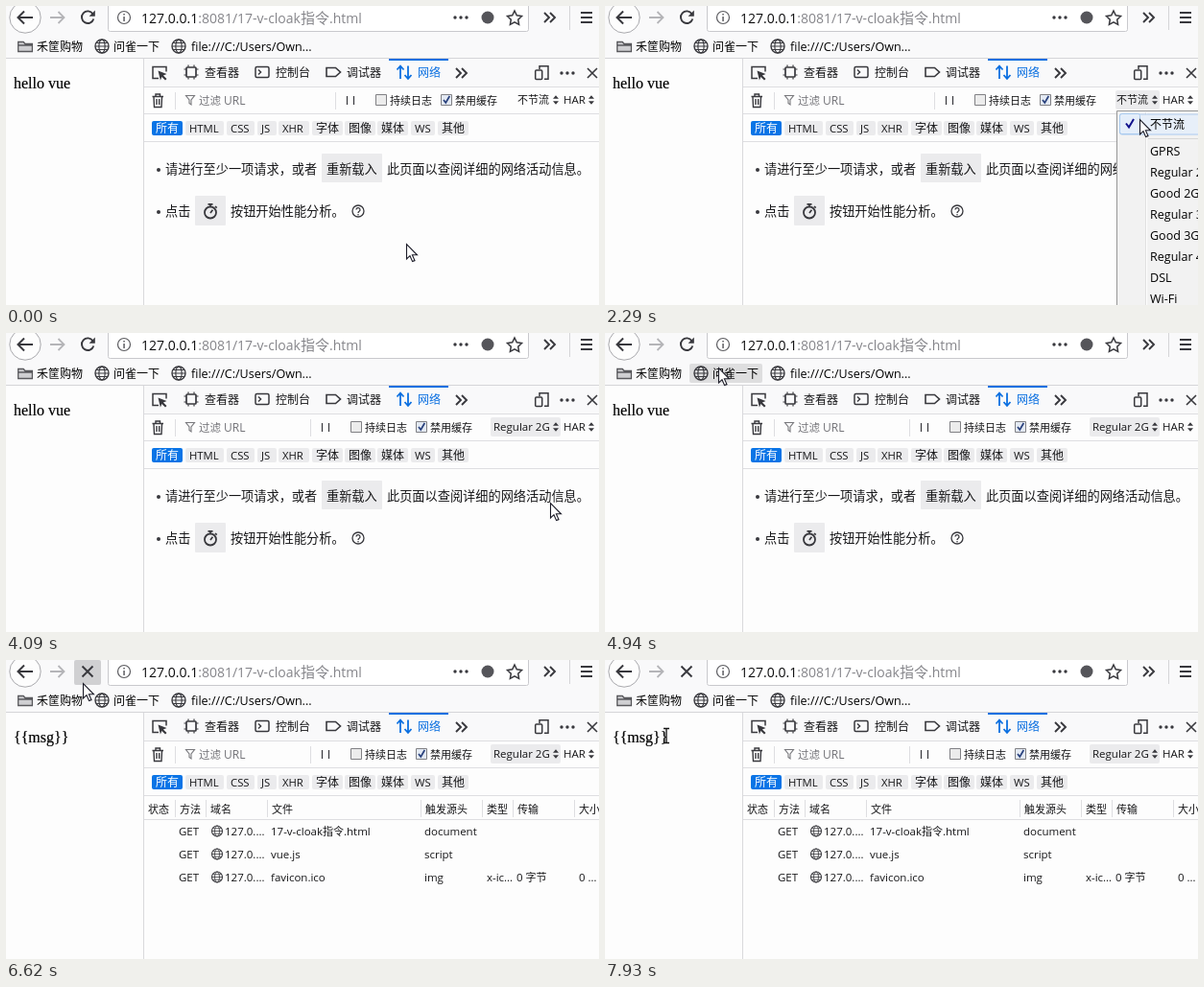
An HTML page with a canvas for the animation above (8 s loop, 618 by 312 pixels).

```html
<!DOCTYPE html>
<html lang="zh">
<head>
<meta charset="utf-8">
<title>v-cloak</title>
<style>
html, body { margin: 0; width: 100%; height: 100%; overflow: hidden; background: #fdfdfd; }
canvas { display: block; }
</style>
</head>
<body>
<canvas id="stage" width="618" height="312"></canvas>
<script>
const ctx = document.getElementById('stage').getContext('2d');
const LOOP = 8000;
const INK = '#161618', ICON = '#38383d', GREY = '#85858a', RULE = '#dedee1', BLUE = '#0a6fe0', CHIP = '#ebebed';
const SANS = '"Open Sans", "Noto Sans CJK SC", "Noto Sans CJK", sans-serif';
const CJK = '"Noto Sans CJK SC", "Noto Sans CJK", sans-serif';
const SERIF = '16px "Liberation Serif", serif';

// start, end, number of steps, destination
const MOVES = [
  [0, 0, 1, 417, 248],
  [410, 1340, 8, 555, 97],
  [2140, 2960, 7, 567, 202],
  [3390, 3660, 3, 567, 177],
  [4400, 4940, 5, 118, 36],
  [5090, 5370, 3, 87, 16],
  [6620, 7120, 5, 23, 96],
  [7250, 7660, 4, 55, 100],
  [7780, 7780, 1, 15, 105],
  [7930, 7930, 1, 64, 79]
];

function pointerAt(t) {
  let x = 0, y = 0;
  for (const [start, end, steps, tx, ty] of MOVES) {
    if (t < start) break;
    const gap = (end - start) / (steps - 1) || 1;
    const p = Math.min(steps, Math.floor((t - start) / gap + 0.1) + 1) / steps;
    const e = p * p * (3 - 2 * p);
    x += (tx - x) * e;
    y += (ty - y) * e;
  }
  return { x, y };
}

function box(x, y, w, h, color, radius = 0) {
  ctx.fillStyle = color;
  ctx.beginPath();
  ctx.roundRect(x, y, w, h, radius);
  ctx.fill();
}

function frame(x, y, w, h, color, radius = 0, width = 1) {
  ctx.strokeStyle = color;
  ctx.lineWidth = width;
  ctx.beginPath();
  ctx.roundRect(x, y, w, h, radius);
  ctx.stroke();
}

function line(d, color = ICON, width = 1.6) {
  ctx.strokeStyle = color;
  ctx.lineWidth = width;
  ctx.stroke(new Path2D(d));
}

function fill(d, color = ICON) {
  ctx.fillStyle = color;
  ctx.fill(new Path2D(d));
}

function ring(x, y, r, color = ICON, width = 1.5, rx = r) {
  ctx.strokeStyle = color;
  ctx.lineWidth = width;
  ctx.beginPath();
  ctx.ellipse(x, y, rx, r, 0, 0, 7);
  ctx.stroke();
}

function dot(x, y, r, color = ICON) {
  ctx.fillStyle = color;
  ctx.beginPath();
  ctx.arc(x, y, r, 0, 7);
  ctx.fill();
}

// Latin and Chinese runs have their own sizes; returns the end of the text
function text(str, x, y, color = INK, cjk = 11, latin = cjk * 1.045) {
  ctx.fillStyle = color;
  for (const run of str.match(/[\u2e80-\uffff]+|[^\u2e80-\uffff]+/g)) {
    ctx.font = run.charCodeAt(0) >= 0x2e80 ? `${cjk}px ${CJK}` : `${latin}px ${SANS}`;
    ctx.fillText(run, x, y);
    x += ctx.measureText(run).width;
  }
  return x;
}

function globe(x, y, r, width) {
  ring(x, y, r, ICON, width);
  ring(x, y, r, ICON, width * 0.8, r * 0.45);
  line(`M${x - r} ${y}h${2 * r}M${x - r * 0.8} ${y - r / 2}h${r * 1.6}M${x - r * 0.8} ${y + r / 2}h${r * 1.6}`, ICON, width * 0.7);
}

const dots = (x, y) => [-6, 0, 6].forEach(dx => dot(x + dx, y, 1.7));
const chevrons = (x, y) => line(`M${x - 6} ${y - 5}l5 5l-5 5M${x} ${y - 5}l5 5l-5 5`, ICON, 1.9);
const sorter = (x, y) => fill(`M${x - 3} ${y - 1.2}l3 -3.6l3 3.6zM${x - 3} ${y + 1.2}l3 3.6l3 -3.6z`);

function checkbox(x, on) {
  box(x, 93, 11, 11, on ? '#e3e9f3' : '#ececec');
  frame(x + 0.5, 92.5, 11, 11, '#808084');
  if (on) line(`M${x + 3} 98l2.3 3l4 -7`, '#28407c', 1.7);
}

function drawReload(t) {
  if (t < 5890) {
    line('M90.5 8.2A6.3 6.3 0 1 0 91.3 13.5', ICON, 1.9);
    fill('M92.8 4.5v6.2h-6.2z');
  } else if (t < 6040) {
    line('M80.5 16.5A6.2 6.2 0 1 1 89.5 16.5', '#8b8b8f', 1.9);
  } else {
    line('M79.5 6.5l11 11M90.5 6.5l-11 11', ICON, 1.9);
  }
}

function drawChrome(t, p) {
  box(0, 0, 618, 55, '#f9f9fa');
  box(106, -4, 439, 31, '#fff', 2);
  frame(106.5, -4.5, 438, 31, '#c9c9cd', 2);
  box(587, 0, 1, 25, '#d5d5d8');
  dot(20, 12, 16, '#fdfdfd');
  ring(20, 12, 16.2, '#a9a9ad', 1);
  line('M28 12H13M19 5.5L12.5 12L19 18.5', ICON, 2);
  line('M46 12h14M54.5 6l6 6l-6 6', '#b5b5b8', 1.8);
  if (p.y < 27 && p.x > 71 && p.x < 99) box(71, 0, 28, 26, t < 5890 ? '#dededf' : '#d0d0d2', 2);
  drawReload(t);

  ring(123, 12, 6.5, '#5c5c60', 1.2);
  box(122.3, 11, 1.5, 5, '#5c5c60');
  box(122.3, 8, 1.5, 1.6, '#5c5c60');
  const end = text('127.0.0.1', 141, 18, '#0c0c0d', 15, 14);
  text(':8081/17-v-cloak指令.html', end, 18, GREY, 15, 14);
  dots(474, 12);
  dot(502, 12, 6.5, '#55555a');
  line('M530 5l2.3 4.8l5.2 .7l-3.8 3.7l.9 5.2l-4.6 -2.5l-4.6 2.5l.9 -5.2l-3.8 -3.7l5.2 -.7z', ICON, 1.5);
  chevrons(567, 12);
  line('M599 7h12M599 12h12M599 17h12', ICON, 1.8);

  if (p.y > 30 && p.y < 54 && p.x > 89 && p.x < 165) box(88, 32, 76, 20, '#dededf', 2);
  const folder = 'M12.7 47.5v-10h5.5l1.7 2h7.5v8z';
  fill(folder, '#cfcfd2');
  line(folder + 'M12.7 41h14.7', '#59595d', 1.3);
  text('禾筐购物', 32, 47, '#000', 12);
  globe(100, 42, 7, 1.4);
  text('问雀一下', 112, 47, '#000', 12);
  globe(180, 42, 7, 1.4);
  text('file:///C:/Users/Own...', 193, 47, '#000', 12);
  box(0, 54, 618, 1, '#d5d5d8');
}

function drawTabs() {
  box(144, 55, 474, 29, '#f9f9fa');
  box(399, 55, 62, 2, BLUE);
  line('M159 75.5h-6v-12h14v5', ICON, 1.5);
  fill('M158.5 67.5l9 3.5l-3.6 1.5l3.6 3.6l-1.5 1.5l-3.6 -3.6l-1.5 3.5z');
  frame(188, 64, 10, 10, ICON, 1, 1.7);
  line('M190 61.5v2M196 61.5v2M190 74.5v2M196 74.5v2M185.5 66h2M185.5 72h2M198.5 66h2M198.5 72h2', ICON, 1.2);
  frame(260, 63.5, 14, 11, ICON, 1.5, 1.5);
  line('M263 66.5l2.6 2.5l-2.6 2.5', ICON, 1.4);
  line('M334 64.5h9.5l5 4.5l-5 4.5h-9.5z', ICON, 1.6);
  line('M411 76v-13M407.5 66.5l3.5 -4l3.5 4M419 62.5v13M415.5 72l3.5 4l3.5 -4', BLUE, 1.8);
  text('查看器', 207, 74, INK, 12);
  text('控制台', 281, 74, INK, 12);
  text('调试器', 355, 74, INK, 12);
  text('网络', 429, 74, BLUE, 12);
  chevrons(475, 70);
  line('M556 66v-3.3h9v13.5h-4', ICON, 1.5);
  frame(551.7, 67, 7, 9.5, ICON, 1, 1.5);
  dots(585, 70);
  line('M606 65l10 10M616 65l-10 10', ICON, 1.6);
  box(144, 84, 474, 1, RULE);
}

function drawFilters(t, p) {
  const slow = t >= 4090, dx = slow ? -26 : 0;
  line('M152.5 94.5h11.5M156 94v-2h4.5v2M154 95l.5 10.5h7.5l.5 -10.5M157 97v6M159.7 97v6', ICON, 1.4);
  box(176, 90, 1, 18, RULE);
  line('M187.5 93.5h9l-3.5 4.5v5l-2 -1.5v-3.5z', '#78787c', 1.1);
  text('过滤 URL', 201, 103, '#737378', 11.5, 12);
  box(343 + dx, 90, 1, 18, RULE);
  line(`M${355.5 + dx} 94v9M${362.5 + dx} 94v9`, ICON, 1.2);
  checkbox(385 + dx, false);
  text('持续日志', 400 + dx, 103);
  checkbox(453 + dx, true);
  text('禁用缓存', 468 + dx, 103);
  const hover = p.x > 532 && p.x < 578 && p.y > 88 && p.y < 109;
  if (slow) box(505, 88, 73, 20, CHIP, 2);
  else if (hover || t >= 1770) box(532, 88, 46, 20, CHIP, 2);
  if (slow) text('Regular 2G', 508, 102);
  else text('不节流', 533, 102);
  sorter(573, 98);
  text('HAR', 581, 102);
  sorter(610, 98);
  box(144, 112, 474, 1, RULE);

  const types = [['所有', 152, 32], ['HTML', 187, 40], ['CSS', 230, 29], ['JS', 262, 20], ['XHR', 284, 32],
    ['字体', 319, 32], ['图像', 353, 32], ['媒体', 387, 32], ['WS', 422, 25], ['其他', 450, 32]];
  types.forEach(([name, x, w], i) => {
    box(x, 120, w, 15, i ? CHIP : '#0a74e6', 2);
    text(name, x + 4, 132, i ? INK : '#fff', 12, 11.3);
  });
  box(144, 141, 474, 1, RULE);
}

function drawHint() {
  const say = (s, x, y) => text(s, x, y, INK, 13.2);
  dot(159, 171, 2);
  say('请进行至少一项请求，或者', 166, 175);
  box(329, 154, 63, 30, CHIP, 1);
  say('重新载入', 334, 175);
  say('此页面以查阅详细的网络活动信息。', 397, 175);
  dot(159, 215, 2);
  say('点击', 166, 219);
  box(197, 198, 32, 31, CHIP, 1);
  ring(213, 215.5, 6, ICON, 1.8);
  line('M210.5 206.8h5M213 207v2.5M218 209l1.7 1.7M213 216l2.4 -3.2', ICON, 1.7);
  say('按钮开始性能分析。', 234, 219);
  ring(367, 214, 6, ICON, 1.3);
  line('M365 212.6a2 2 0 1 1 3 1.7q-1 .5 -1 1.6', ICON, 1.3);
  dot(367, 217.7, 0.8);
}

function drawTable(t) {
  const heads = [['状态', 148], ['方法', 181], ['域名', 213], ['文件', 277], ['触发源头', 437], ['类型', 501], ['传输', 533], ['大小', 597]];
  heads.forEach(([name, x], i) => {
    text(name, x, 160);
    if (i) box(x - 5, 146, 1, 18, RULE);
  });
  box(144, 166, 474, 1, RULE);
  const rows = [
    [5890, '17-v-cloak指令.html', 'document'],
    [6190, 'vue.js', 'script'],
    [6620, 'favicon.ico', 'img', 'x-ic…', '0 字节', '0 …']
  ];
  rows.forEach(([start, ...cells], i) => {
    if (t < start) return;
    const y = 183 + 24 * i;
    text('GET', 180, y);
    globe(220, y - 4.5, 5.5, 1.1);
    text('127.0.…', 228, y);
    cells.forEach((cell, c) => text(cell, [276, 436, 501, 532, 597][c], y));
  });
}

function drawMenu(p) {
  box(533, 109, 90, 210, '#f2f2f2');
  frame(533.5, 109.5, 90, 210, '#979797');
  box(563, 111, 1, 201, '#e0e0e0');
  box(564, 111, 1, 201, '#fff');
  box(566, 138, 52, 1, '#d8d8d8');
  const items = ['不节流', 'GPRS', 'Regular 2G', 'Good 2G', 'Regular 3G', 'Good 3G', 'Regular 4G / LTE', 'DSL', 'Wi-Fi'];
  const mid = i => i ? 129.5 + 22 * i : 123.5;
  items.forEach((name, i) => {
    if (Math.abs(p.y - mid(i)) >= 11 || p.y < 112) return;
    box(537, mid(i) - 10, 90, 21, '#e7eff9', 2);
    frame(536.5, mid(i) - 10.5, 90, 21, '#aecbee', 2);
  });
  box(537, 113, 21, 20, '#e4eefa', 2);
  frame(536.5, 112.5, 21, 21, '#a9cbf0', 2);
  line('M543 122.5l3 4l5 -8.5', '#10108c', 2);
  items.forEach((name, i) => text(name, 568, mid(i) + 4.5, '#000', 12));
}

function drawPage(t) {
  const message = t < 6190 ? 'hello vue' : '{{msg}}';
  ctx.fillStyle = ctx.strokeStyle = '#000';
  ctx.font = SERIF;
  ctx.lineWidth = 0.2;
  ctx.fillText(message, 8, 86);
  ctx.strokeText(message, 8, 86);
}

function drawPointer(t, { x, y }) {
  ctx.save();
  ctx.translate(Math.round(x), Math.round(y));
  if (t >= 7930) {
    line('M-3 -7.5h2.5l.5 .5l.5 -.5h2.5M0 -7v14M-3 7.5h2.5l.5 -.5l.5 .5h2.5', '#111', 1.3);
  } else {
    const arrow = 'M.5 .5V16L4 12.7L6.6 18.6L9 17.6L6.4 11.8H11.5Z';
    fill(arrow, '#fff');
    line(arrow, '#1c1c28', 1.1);
  }
  ctx.restore();
}

function draw() {
  const t = performance.now() % LOOP;
  const p = pointerAt(t);
  box(0, 0, 618, 312, '#fdfdfd');
  drawChrome(t, p);
  drawPage(t);
  drawTabs();
  drawFilters(t, p);
  if (t < 5890) drawHint();
  else drawTable(t);
  box(143, 55, 1, 257, '#d9d9dc');
  if (t >= 1770 && t < 4090) drawMenu(p);
  drawPointer(t, p);
  requestAnimationFrame(draw);
}
draw();
</script>
</body>
</html>
```
